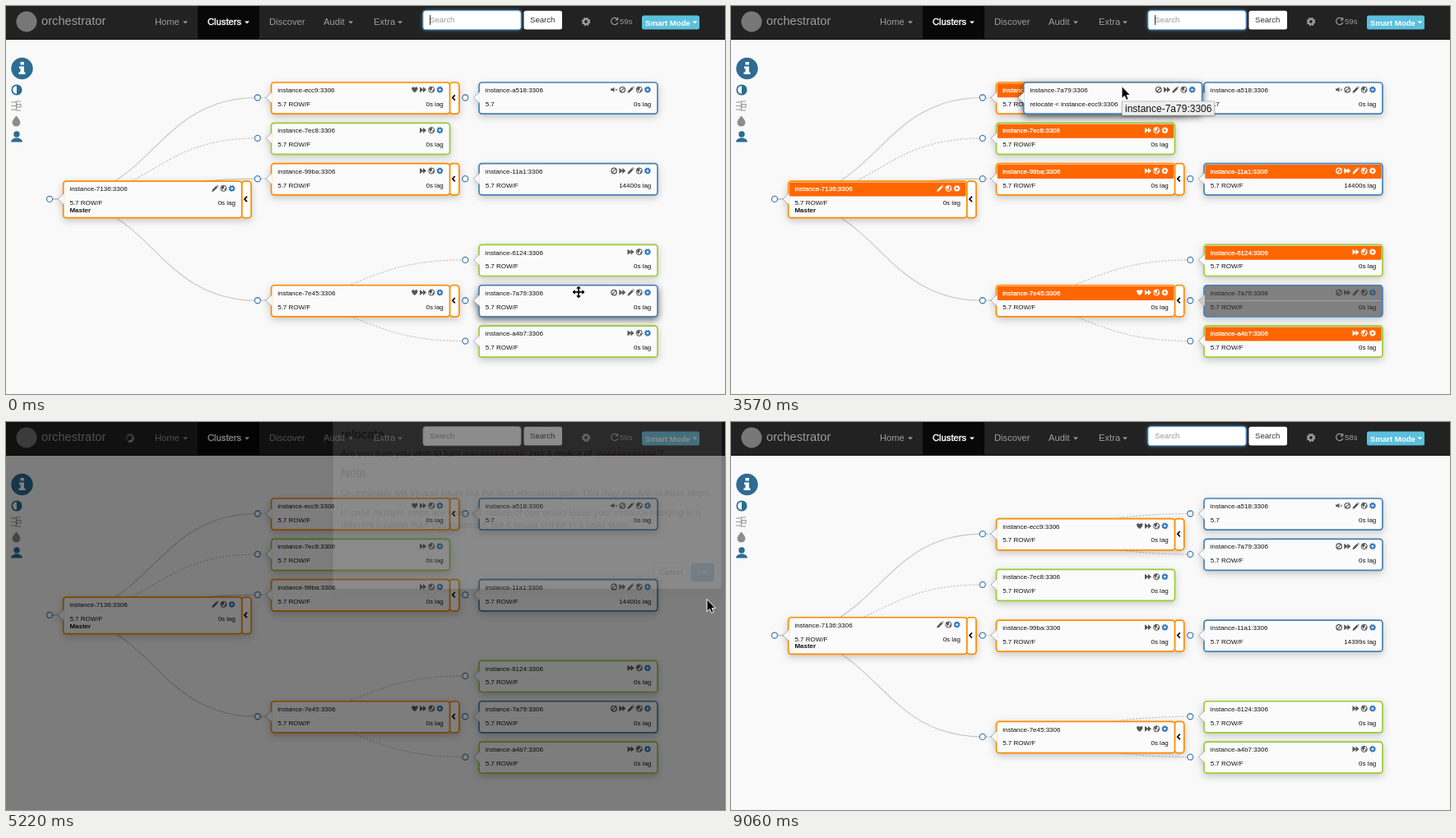
An HTML page for the animation above (9160 ms loop, 874 by 472 pixels).

```html
<!DOCTYPE html>
<html lang="en">
<head>
<meta charset="utf-8">
<title>Topology: relocate a replica</title>
<style>
  html, body { margin: 0; width: 100%; height: 100%; overflow: hidden; background: #f9f9f9; }
  svg { display: block; width: 874px; height: 472px; font-family: "Liberation Sans", Arial, sans-serif; }
  text { white-space: pre; }
  .card { filter: drop-shadow(0 3px 4px rgba(0,0,0,.2)); }
  .card.raised { filter: drop-shadow(0 3px 4px rgba(0,0,0,.6)); }
  .tip { filter: drop-shadow(0 1px 1px rgba(0,0,0,.35)); }
  .glow { filter: drop-shadow(0 0 2px rgba(102,175,233,.6)); }
  .modal { filter: drop-shadow(0 4px 6px rgba(0,0,0,.4)); }
</style>
</head>
<body>
<svg id="stage" viewBox="0 0 874 472"></svg>
<script>
const LOOP = 9160;
const BG = '#f9f9f9', ORANGE = '#ff8c00', GREEN = '#9acd32', BLUE = '#4682b4', HOT = '#ff6600', SIDE = '#2d6c93';
const COLUMNS = [53, 305.8, 558.3];
const stage = document.getElementById('stage');

// Rows are tree slots before and after the move.
const NODES = [
  { id: '7136', col: 0, rows: [2.5, 3], color: ORANGE, icons: 'pencil globe', open: true, master: true },
  { id: 'ecc9', col: 1, rows: [0, .5], color: ORANGE, icons: 'heart ff globe', open: true },
  { id: '7ec8', col: 1, rows: [1, 1.75], color: GREEN, icons: 'ff globe' },
  { id: '99ba', col: 1, rows: [2, 3], color: ORANGE, icons: 'ff globe', open: true },
  { id: '7e45', col: 1, rows: [5, 5.5], color: ORANGE, icons: 'heart ff globe', open: true },
  { id: 'a518', col: 2, rows: [0, 0], color: BLUE, icons: 'mute ban pencil globe', version: '5.7', parents: ['ecc9', 'ecc9'] },
  { id: '11a1', col: 2, rows: [2, 3], color: BLUE, icons: 'ban ff pencil globe', lags: ['14400s', '14399s'], parents: ['99ba', '99ba'] },
  { id: '6124', col: 2, rows: [4, 5], color: GREEN, icons: 'ff globe', parents: ['7e45', '7e45'] },
  { id: '7a79', col: 2, rows: [5, 1], color: BLUE, icons: 'ban ff pencil globe', parents: ['7e45', 'ecc9'] },
  { id: 'a4b7', col: 2, rows: [6, 6], color: GREEN, icons: 'ff globe', parents: ['7e45', '7e45'] }
];
const MOVED = NODES.find(n => n.id === '7a79');

// The screen only refreshes at these moments: [first, last, count].
const RUNS = [[0, 0, 1], [300, 300, 1], [590, 1470, 7], [1620, 2970, 10], [3420, 5670, 16],
  [5960, 6710, 6], [7010, 7010, 1], [7310, 7310, 1], [7760, 7760, 1], [8360, 8360, 1], [9060, 9060, 1]];

function snap(t) {
  const [first, last, n] = RUNS.filter(r => r[0] <= t).pop();
  const gap = n > 1 ? (last - first) / (n - 1) : 1;
  return first + Math.min(n - 1, Math.floor((t - first) / gap + 1e-6)) * gap;
}

// Linear keys: [time, value...].
function track(t, keys) {
  if (t <= keys[0][0]) return keys[0].slice(1);
  for (let i = 1; i < keys.length; i++) {
    const a = keys[i - 1], b = keys[i];
    if (t <= b[0]) return a.slice(1).map((v, k) => v + (b[k + 1] - v) * (t - a[0]) / (b[0] - a[0]));
  }
  return keys[keys.length - 1].slice(1);
}

const within = (t, a, b) => t >= a - .01 && t < b - .01;
const ease = u => u < .5 ? 4 * u ** 3 : 1 - (2 - 2 * u) ** 3 / 2;
const rect = (x, y, w, h, fill, more = '') => `<rect x="${x}" y="${y}" width="${w}" height="${h}" fill="${fill}" ${more}/>`;
const path = (d, more = '') => `<path d="${d}" ${more}/>`;
const circle = (x, y, r, more = '') => `<circle cx="${x}" cy="${y}" r="${r}" ${more}/>`;
const at = (x, y, body, more = '') => `<g transform="translate(${x} ${y})" ${more}>${body}</g>`;
const line = (w, color = 'currentColor') => `fill="none" stroke="${color}" stroke-width="${w}"`;
const heavy = (color, w = .3) => `stroke="${color}" stroke-width="${w}"`;
const text = (x, y, s, size, fill, more = '') =>
  `<text x="${x}" y="${y}" font-size="${size}" fill="${fill}" ${more}>${s.replace('<', '&lt;')}</text>`;

const INK = 'fill="currentColor"';
const ICONS = {
  gear: circle(0, 0, 2.3, line(1.8)) + circle(0, 0, 3.4, line(1.2) + ' stroke-dasharray="1.4 1.27"'),
  globe: circle(0, 0, 3.6, line(1)) + path('M-3-1.6Q-1.5-3.8 1-3L.4-1.5 1.2-.6-.8.6-.2 2.8-1.5 1.5ZM1.6.2 3.4-.5 2.6 2.2 1 2.6Z', INK),
  pencil: path('M-4 4-3.4 1.6 1.4-3.2 3.2-1.4-1.6 3.4ZM2-3.8 2.7-4.3 4.3-2.7 3.8-2Z', INK),
  ff: path('M-4-3.5 0-.4V-3.5L4 0 0 3.5V.4L-4 3.5Z', INK),
  heart: path('M0 3.5C-6.5-1-3-5.3 0-2.2C3-5.3 6.5-1 0 3.5Z', INK),
  ban: circle(0, 0, 3.3, line(1.2)) + path('M-2.2 2.2 2.2-2.2', line(1.1)),
  mute: path('M-4-1.2H-2L.3-3V3L-2 1.2H-4Z', INK) + path('M1.6-1.1 3.8 1.1M3.8-1.1 1.6 1.1', line(.8))
};
const icon = (name, x, y, color, scale = 1) =>
  `<g transform="translate(${x} ${y}) scale(${scale})" color="${color}">${ICONS[name]}</g>`;
const caret = (x, fill) => path(`M${x - 3} 18.5h6l-3 3z`, `fill="${fill}"`);

const place = (node, after) => ({ x: COLUMNS[node.col], y: 111.5 + 49.35 * node.rows[after] });
const topOf = (node, y) => y - (node.master ? 22 : 18.7);

function card(node, x, top, o) {
  const h = node.master ? 45 : 38.5, mid = top + (node.master ? 22 : 18.7);
  const ink = o.dim ? '#222' : '#111', head = o.hot ? '#fff' : ink;
  const frame = `rx="3.5" ${heavy(node.color, 1.7)}`;
  let s = '';
  if (node.open) {
    s += rect(x + 217.5, top + .2, 11.5, h - .4, '#fff', frame) +
      path(`M${x + 224} ${mid - 3.2}l-3 3.2 3 3.2`, line(1.8, '#111'));
  }
  s += rect(x + .7, top + .2, 217, h - .4, o.dim ? '#808080' : '#fbfbfb', frame);
  if (o.hot) s += rect(x + 2, top + 1.5, 214.4, 17, HOT, 'rx="1.5"');
  if (o.dim) s += rect(x + 2, top + 18.6, 214, .8, '#aaa');
  s += path(`M${x + 1.6} ${mid - 7}L${x - 6} ${mid}L${x + 1.6} ${mid + 7}`, `fill="${o.dim ? '#ccc' : '#fbfbfb'}" ${heavy('#aaa', .9)}`);
  s += text(x + 8.4, top + 12.3, `instance-${node.id}:3306`, 8, head, o.hot ? heavy('#fff', .25) : '');
  const base = x + 205.6, iy = top + 9;
  s += icon('gear', base, iy, o.hot ? '#fff' : o.dim ? '#2a5f8e' : '#2e77bd');
  node.icons.split(' ').reverse().forEach((name, i) => {
    s += icon(name, base - 10.2 * (i + 1), iy, o.hot ? '#fff' : o.dim ? '#444' : '#555');
  });
  if (o.body !== undefined) s += text(x + 8.4, top + 29, o.body, 8, ink);
  else {
    s += text(x + 8.4, top + 29, node.version || '5.7 ROW/F', 8, ink) +
      text(x + 210, top + 29, (node.lags ? node.lags[o.after] : '0s') + ' lag', 8, ink, 'text-anchor="end"');
    if (node.master) s += text(x + 8.4, top + 37.8, 'Master', 8, ink, 'font-weight="bold"');
  }
  return `<g class="card${o.raised ? ' raised' : ''}">${s}</g>`;
}

function tree(t, after, dragging) {
  const grow = after ? ease(Math.min(1, (t - 5960) / 750)) : 1;
  const root = place(NODES[0], after);
  const pos = {};
  NODES.forEach(n => {
    const p = place(n, after);
    pos[n.id] = { x: root.x + (p.x - root.x) * grow, y: root.y + (p.y - root.y) * grow };
  });
  let links = '', cards = '', dots = '';
  NODES.forEach(n => {
    const p = pos[n.id];
    if (!n.master) {
      const q = pos[n.parents ? n.parents[after] : '7136'], m = (p.x + q.x) / 2;
      links += path(`M${q.x} ${q.y}C${m} ${q.y} ${m} ${p.y} ${p.x} ${p.y}`,
        line(1.2, '#c8c8c8') + (n.open ? '' : ' stroke-dasharray="2.4 1.6"'));
    }
    const dim = dragging && n === MOVED;
    cards = card(n, p.x + 16, topOf(n, p.y), {
      after, dim, hot: dragging && !dim && n.id !== 'a518', raised: n === MOVED && t < 590
    }) + cards;
    dots += circle(p.x, p.y, 3.5, `fill="#fff" ${heavy(BLUE, 1.3)}`);
  });
  return links + cards + dots;
}

function spinner(t) {
  let s = '';
  for (let i = 0; i < 12; i++) {
    s += path('M0-2.8V-5.6', `${line(1.3, '#fff')} opacity="${.15 + .07 * i}" transform="rotate(${30 * i + t * .8})"`);
  }
  return at(150.5, 19.5, s);
}

function nav(t) {
  const focus = t < 4020 || t >= 6110, grey = '#9d9d9d';
  const off = [[890, 1330], [1770, 2370], [2820, 3420], [4020, 7310], [7760, 8360], [9060, LOOP]];
  let s = rect(0, 0, 874, 41, '#222') + rect(0, 40, 874, 1, '#080808') + rect(233, 0, 75, 39.5, '#080808');
  s += circle(25, 19, 12.5, 'fill="#777"') + text(43, 23, 'orchestrator', 14.7, grey);
  [['Home', 181, 218], ['Clusters', 245, 293], ['Discover', 320], ['Audit', 386, 419], ['Extra', 447, 479]].forEach(([label, x, c]) => {
    const fill = label === 'Clusters' ? '#fff' : grey;
    s += text(x, 23, label, 11.2, fill, fill === '#fff' ? heavy(fill, .4) : '');
    if (c) s += caret(c, fill);
  });
  s += rect(507, 5.7, 119, 23, '#fff', `rx="3" ${heavy(focus ? '#66afe9' : '#ccc', 1)} ${focus ? 'class="glow"' : ''}`);
  s += text(515, 20.3, 'Search', 9.6, '#999');
  if (!off.some(([a, b]) => within(t, a, b))) s += rect(515, 11, 1, 12, '#333');
  s += rect(629.5, 5.7, 46.5, 22.8, '#fff', 'rx="2.5"') + text(637, 20.3, 'Search', 9.6, '#333');
  s += icon('gear', 705, 19, grey, 1.35);
  if (!within(t, 5960, 7010)) {
    const secs = within(t, 1040, 2070) || t >= 9060 ? '58s' : '59s';
    s += path('M742.5 15.3A4.2 4.2 0 1 0 743.8 19.8', line(1.2, grey)) + path('M744.3 13.5v4h-4z', `fill="${grey}"`);
    s += text(746, 22, secs, 9.6, grey);
    s += rect(773, 11.5, 70, 17, '#5bc0de', 'rx="2.5"') + text(777, 23.5, 'Smart Mode', 9.6, '#fff', 'font-weight="bold"') + caret(837.5, '#fff');
  }
  return s + (within(t, 5220, 5960) ? spinner(t) : '');
}

function sidebar() {
  return circle(19.5, 76, 13.2, `fill="${SIDE}"`) +
    path('M17.5 68h4.5v3.5h-4.5zM16 73.5h6v7h1.5v2.5h-8v-2.5h2v-4.5h-1.5z', 'fill="#fff"') +
    circle(13, 102, 5.7, line(1.7, SIDE)) + path('M13 96.5a5.5 5.5 0 0 1 0 11z', `fill="${SIDE}"`) +
    path('M6 117h4l3-1h5M6 121.5h6M6 126h4l3 1h5M12.5 116v11M13 119.500h5v3.500h-5z', line(1.2, '#999')) +
    path('M12.5 133.5Q18 139.5 17.3 142.5A4.9 4.9 0 0 1 7.7 142.5Q7 139.5 12.5 133.5Z', 'fill="#8d8d8d"') +
    circle(13, 156, 3.7, `fill="${SIDE}"`) + path('M6 165.5Q6 162 11 160.5h4Q20 162 20 165.5Z', `fill="${SIDE}"`);
}

function modal(t) {
  const keys = [[3720, 0, -51], [3870, .36, -37], [4020, 1, -10], [4170, 1, 0], [5070, 1, 0], [5220, .1, -27], [5370, 0, -45]];
  const [alpha, dy] = track(t, keys);
  const [shade] = track(t, [[3720, .25], [3870, .5], [5370, .5], [5520, 0]]);
  const muted = '#777';
  const code = x => rect(x - 3, 58, 78.5, 14, '#f9f2f4', 'rx="3"') +
    text(x, 69, '############', 10.08, '#c7254e', 'font-family="Liberation Mono, monospace"');
  const s = rect(397.5, 24, 472.5, 206, '#fff', `rx="4" class="modal" ${heavy('#999', .6)}`) +
    text(407, 47, 'relocate', 14.9, '#333', heavy('#333')) +
    text(407, 69, 'Are you sure you wish to turn', 11.2, '#333') + code(557.5) +
    text(636, 69, 'into a replica of', 11.2, '#333') + code(718) + text(793, 69, '?', 11.2, '#333') +
    text(407, 94, 'Note', 14.4, muted, heavy(muted)) +
    text(407, 117, 'Orchestrator will try and figure out the best relocation path. This may involve multiple steps.', 11.2, muted) +
    text(407, 140.5, 'In case multiple steps are involved, failure of one would leave your instance hanging in a', 11.2, muted) +
    `<text x="407" y="156" font-size="11.2" fill="${muted}">different location than you expected, but it would still be in a <tspan font-style="italic">valid</tspan> state.</text>` +
    rect(787.5, 199, 41, 21.5, '#fff', `rx="2.5" ${heavy('#ccc', .8)}`) + text(808, 213, 'Cancel', 9.2, '#333', 'text-anchor="middle"') +
    rect(833, 199, 27.5, 21.5, '#428bca', `rx="2.5" ${heavy('#357ebd', .8)}`) + text(846.7, 213, 'OK', 9.2, '#fff', 'text-anchor="middle"');
  return rect(0, 0, 874, 472, '#000', `opacity="${shade}"`) + at(0, dy, s, `opacity="${alpha}"`);
}

function pointer(t, [x, y]) {
  const edge = `fill="#000" ${heavy('#fff', 1)} stroke-linejoin="round"`;
  if (t < 590) {
    const arm = 'M0-8 3.8-4H1.3V-1.3H4V-3.8L8 0 4 3.8V1.3H1.3V4H3.8L0 8-3.8 4H-1.3V1.3H-4V3.8L-8 0-4-3.8V-1.3H-1.3V-4H-3.8Z';
    return at(x, y, path(arm, edge));
  }
  if (within(t, 3870, 4170)) {
    const beam = 'M-3-7Q0-7 0-5Q0-7 3-7M0-5V5M-3 7Q0 7 0 5Q0 7 3 7M-1.5 2H1.5';
    return at(x, y, path(beam, line(2.6, '#fff') + ' opacity=".4"') + path(beam, line(1.4, '#000')));
  }
  return at(x, y, path('M0-.5V14.5L3.4 11.4 5.7 16.4 8.2 15.3 6 10.4H10.5Z', edge));
}

function tooltip([x, y]) {
  return `<g class="tip">${rect(x + .5, y + 18, 112, 17, '#eee', heavy('#bbb', .7))}</g>` +
    text(x + 4, y + 31, 'instance-7a79:3306', 12, '#111');
}

function dragged(t, cursor) {
  const [x, top] = track(t, [[590, 574, 340], [1470, 443.5, 239], [1620, 428, 217], [2070, 385, 150], [2520, 358, 100], [2820, 355, 92.8]]);
  const over = NODES.find(n => {
    const p = place(n, 0), dx = cursor[0] - p.x - 16, dy = cursor[1] - topOf(n, p.y);
    return n !== MOVED && dx > 0 && dx < 218 && dy > 0 && dy < 38;
  });
  return card(MOVED, x, top, { raised: true, body: over ? `relocate < instance-${over.id}:3306` : '' });
}

function scene(t) {
  const dragging = within(t, 590, 3720), after = t >= 5960 ? 1 : 0;
  const cursor = track(t, [[590, 696, 348], [1470, 558, 228], [1620, 545, 212], [2070, 505, 152], [2520, 478, 104],
    [2820, 475, 98], [4170, 475, 98], [4920, 852, 216]]);
  let s = rect(0, 0, 874, 472, BG);
  if (!after || t >= 6110) s += tree(t, after, dragging);
  s += sidebar() + nav(t);
  if (dragging) s += dragged(t, cursor);
  if (within(t, 300, 590) || within(t, 2970, 3720)) s += tooltip(cursor);
  if (within(t, 3720, 5520)) s += modal(t);
  if (t < 5370) s += pointer(t, cursor);
  return s;
}

let shown = -1;
const began = performance.now();
function tick() {
  const t = snap((performance.now() - began) % LOOP);
  if (t !== shown) {
    shown = t;
    stage.innerHTML = scene(t);
  }
  requestAnimationFrame(tick);
}
tick();
</script>
</body>
</html>
```
